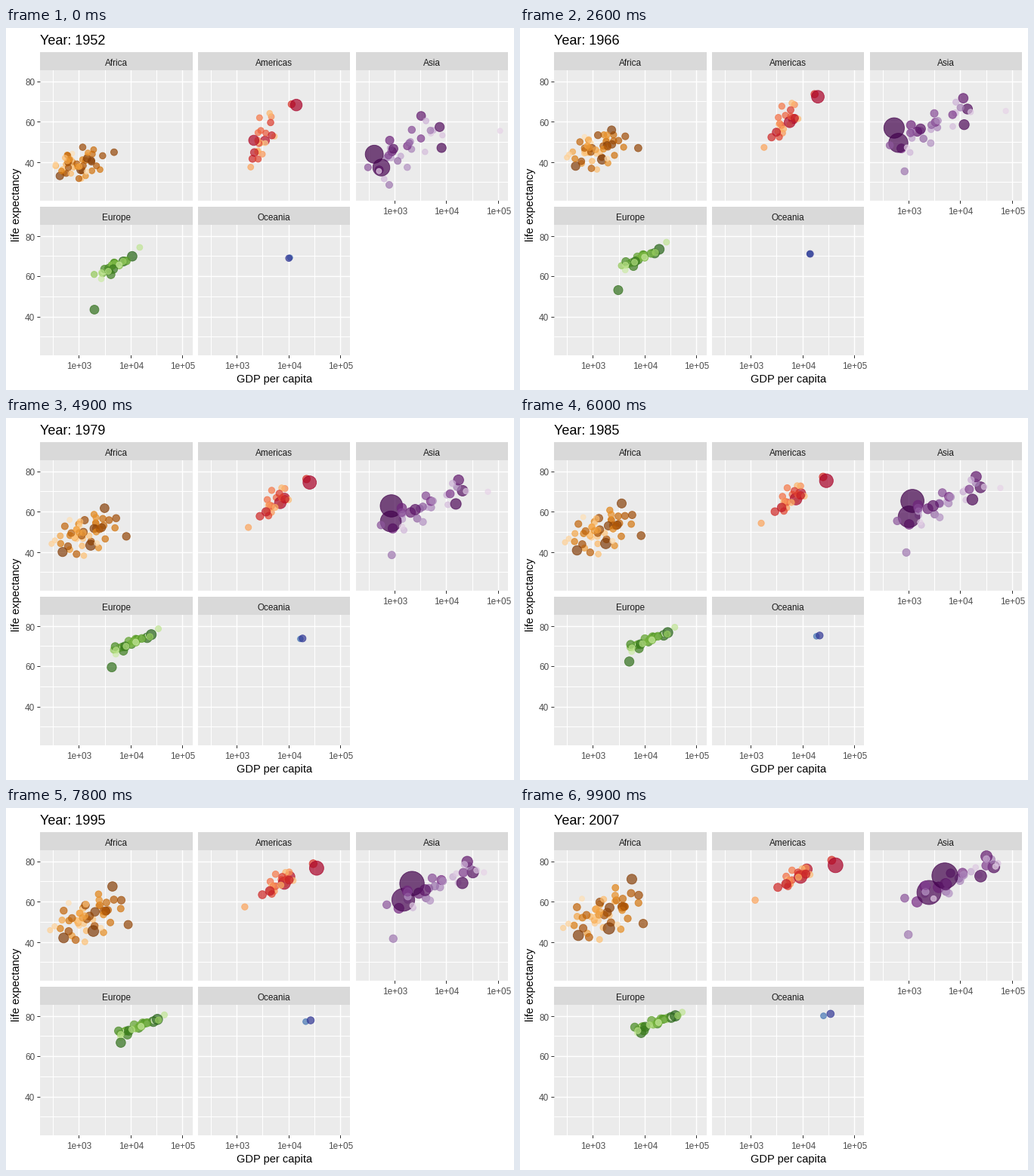
A matplotlib script for the animation above (10 s loop, 672x480 px).

```python
import numpy as np
import matplotlib.pyplot as plt
from matplotlib.animation import FuncAnimation
from matplotlib.colors import LinearSegmentedColormap
from matplotlib.patches import Rectangle

W, H, DPI = 672, 480, 96
FRAMES, STEP = 100, 100
FIRST, LAST = 1952, 2007
PANEL_W, PANEL_H, STRIP_H = 201.2, 173, 24
PX_DECADE, PX_YEAR = 68.43, 2.673     # pixels per power of ten, per year of life
LOG_MIN, LIFE_MAX = 2.2487, 85.55
MAX_POP = 1319                        # millions
ALPHA = 0.7

plt.rcParams["font.family"] = "Liberation Sans"
rng = np.random.default_rng(12)

# leaders: income from, to, pace; life expectancy from, to; final population
# crowd: count, then (from, to) of log income, its spread, life, slope and scatter
REGIONS = [
    dict(name="Africa", cell=(0, 0), growth=0.27, pace=(0.7, 0.55), pop=(9, 1.1),
         ramp=["#7F3B08", "#B35806", "#E08214", "#FDB863", "#FEE0B6"],
         leaders=[(1077, 2014, 0.5, 36.3, 46.9, 135),
                  (4725, 9270, 0.3, 45, 49.3, 44),
                  (1419, 5581, 0.8, 41.9, 71.3, 80)],
         crowd=(49, (2.95, 3.18), (0.27, 0.38), (39, 54), (4, 11), (4, 6))),
    dict(name="Americas", cell=(1, 0), growth=0.48, pace=(0.6, 0.65), pop=(8, 1.1),
         ramp=["#A80026", "#D73027", "#F46D43", "#FDAE61", "#FDCB8A"],
         leaders=[(13990, 42952, 0.9, 68.4, 78.2, 301),
                  (2109, 9066, 0.3, 50.9, 72.4, 190),
                  (3478, 11978, 0.5, 50.8, 76.2, 109),
                  (11367, 36319, 0.8, 68.8, 80.7, 33),
                  (1840, 1202, 2.0, 37.6, 60.9, 8.5)],
         crowd=(20, (3.48, 3.86), (0.18, 0.19), (53, 72.8), (20, 10), (5, 1.8))),
    dict(name="Asia", cell=(2, 0), growth=0.4, pace=(0.8, 0.6), pop=(22, 1.3),
         ramp=["#40004B", "#762A83", "#9970AB", "#C2A5CF", "#E7D4E8"],
         leaders=[(400, 4959, 1.7, 44, 73, MAX_POP),
                  (547, 2452, 1.8, 37.4, 64.7, 1110),
                  (3217, 31656, 0.45, 63, 82.6, 127),
                  (108382, 47307, 0.6, 55.6, 77.6, 2.5),
                  (779, 975, 1.0, 28.8, 43.8, 32)],
         crowd=(28, (3.2, 3.82), (0.36, 0.45), (47, 70), (13, 11), (5, 2.6))),
    dict(name="Europe", cell=(0, 1), growth=0.73, pace=(0.6, 0.8), pop=(9, 1.1),
         ramp=["#276419", "#4D9221", "#7FBC41", "#B8E186", "#E6F5D0"],
         leaders=[(1969, 8458, 0.9, 43.6, 71.8, 71),
                  (7144, 32170, 0.5, 67.5, 79.4, 82)],
         crowd=(28, (3.73, 4.28), (0.22, 0.24), (66, 77.3), (12, 8), (1.8, 1.1))),
    dict(name="Oceania", cell=(1, 1), growth=0.44, pace=(1, 1.3), pop=(1, 1),
         ramp=["#313695", "#4575B4"],
         leaders=[(10040, 34435, 1.0, 69.1, 81.2, 20.4),
                  (10557, 25185, 0.9, 69.4, 80.2, 4.1)],
         crowd=(0, (4, 4), (0, 0), (70, 80), (0, 0), (0, 0))),
]

fig = plt.figure(figsize=(W / DPI, H / DPI), dpi=DPI, facecolor="white")
ax = fig.add_axes([0, 0, 1, 1])
ax.set(xlim=(0, W), ylim=(H, 0))
ax.axis("off")


def to_x(left, log):
    return left + (log - LOG_MIN) * PX_DECADE


def to_y(top, life):
    return top + (LIFE_MAX - life) * PX_YEAR


def crisp(v):
    return np.floor(v) + 0.5


def label(x, y, s, px=11.73, color="#4D4D4D", ha="center", rotation=0):
    return ax.text(x, y, s, fontsize=px * 72 / DPI, color=color, ha=ha,
                   va="baseline", rotation=rotation, rotation_mode="anchor")


def line(xs, ys, color="white", px=1.0):
    ax.plot(xs, ys, color=color, lw=px * 72 / DPI, solid_capstyle="butt",
            snap=False, zorder=2)


def draw_panel(left, top, name, x_axis, y_axis):
    right, bottom = left + PANEL_W, top + PANEL_H
    for y, h, color in ((top - STRIP_H, STRIP_H, "#D9D9D9"), (top, PANEL_H, "#EBEBEB")):
        ax.add_patch(Rectangle((left, y), PANEL_W, h, fc=color, lw=0, snap=True))
    label(left + PANEL_W / 2, top - 6, name, color="#1A1A1A")

    for log in np.arange(2.5, 5.1, 0.5):
        x, major = crisp(to_x(left, log)), log % 1 == 0 
        line([x, x], [top, bottom], px=1.42 if major else 1)
        if major and x_axis:
            line([x, x], [bottom, bottom + 4], "#333333")
            label(x, bottom + 18, f"1e+0{log:.0f}")
    for life in range(30, 81, 10):
        y, major = crisp(to_y(top + 0.3, life)), life % 20 == 0
        line([left, right], [y, y], px=1.42 if major else 1)
        if major and y_axis:
            line([left - 4, left], [y, y], "#333333")
            label(left - 7, y + 5, str(life), ha="right")


def make_crowd(n, log, spread, life, slope, scatter, pop):
    """Bubbles scattered about a trend line; each keeps its bias as the trend moves."""
    def bias(sd):
        own, drift = rng.normal(size=(n, 1)), rng.normal(size=(n, 2))
        return np.array(sd) * np.clip(0.9 * own + 0.35 * drift, -2, 2)

    dx = bias(spread)
    y = np.array(life) + np.array(slope) * dx + bias(scatter)
    people = pop[0] * np.exp(pop[1] * rng.normal(size=n))
    return np.array(log) + dx, np.minimum(y, 82), np.clip(people, 0.3, 150)


class Bubbles:
    def __init__(self, left, top, spec):
        lead = np.array(spec["leaders"])
        cx, cy, cp = make_crowd(*spec["crowd"], spec["pop"])
        order = rng.permutation(len(lead) + len(cp))
        x = np.vstack([np.log10(lead[:, :2]), cx])[order]
        y = np.vstack([lead[:, 3:5], cy])[order]
        self.x, self.y = to_x(left, x), to_y(top + 0.3, y)
        self.pop = np.r_[lead[:, 5], cp][order]
        x_pace, self.y_pace = spec["pace"]
        self.x_pace = np.r_[lead[:, 2], np.full(len(cp), x_pace)][order]
        self.growth = spec["growth"]

        # Larger populations take the darker end of the ramp
        rank = np.argsort(np.argsort(-self.pop)) / (len(self.pop) - 1)
        rgba = LinearSegmentedColormap.from_list("ramp", spec["ramp"])(rank)
        rgba[:, 3] = ALPHA
        self.dots = ax.scatter(self.x[:, 0], self.y[:, 0], c=rgba, edgecolors=rgba,
                               linewidths=0.7, zorder=5)

    def update(self, t):
        x = self.x[:, 0] + np.diff(self.x)[:, 0] * t ** self.x_pace
        y = self.y[:, 0] + np.diff(self.y)[:, 0] * t ** self.y_pace
        self.dots.set_offsets(np.column_stack([x, y]))
        pop = self.pop * (self.growth + (1 - self.growth) * t)
        size = 2 + 10 * np.sqrt(pop / MAX_POP)
        self.dots.set_sizes((2.1 * size + 0.5) ** 2)


regions = []
for spec in REGIONS:
    col, row = spec["cell"]
    left, top = 45.4 + 208.8 * col, 56 + 205 * row
    draw_panel(left, top, spec["name"], row == 1 or col == 2, col == 0)
    regions.append(Bubbles(left, top, spec))

title = label(45, 22, "", px=18, color="black", ha="left")
label(355, 470, "GDP per capita", px=14.67, color="black")
label(18, 234, "life expectancy", px=14.67, color="black", rotation=90)


def update(i):
    t = i / (FRAMES - 1)
    title.set_text(f"Year: {round(FIRST + (LAST - FIRST) * t)}")
    for r in regions:
        r.update(t)
    return [title] + [r.dots for r in regions]


anim = FuncAnimation(fig, update, frames=FRAMES, interval=STEP, repeat=True,
                     repeat_delay=0)
plt.show()
```
